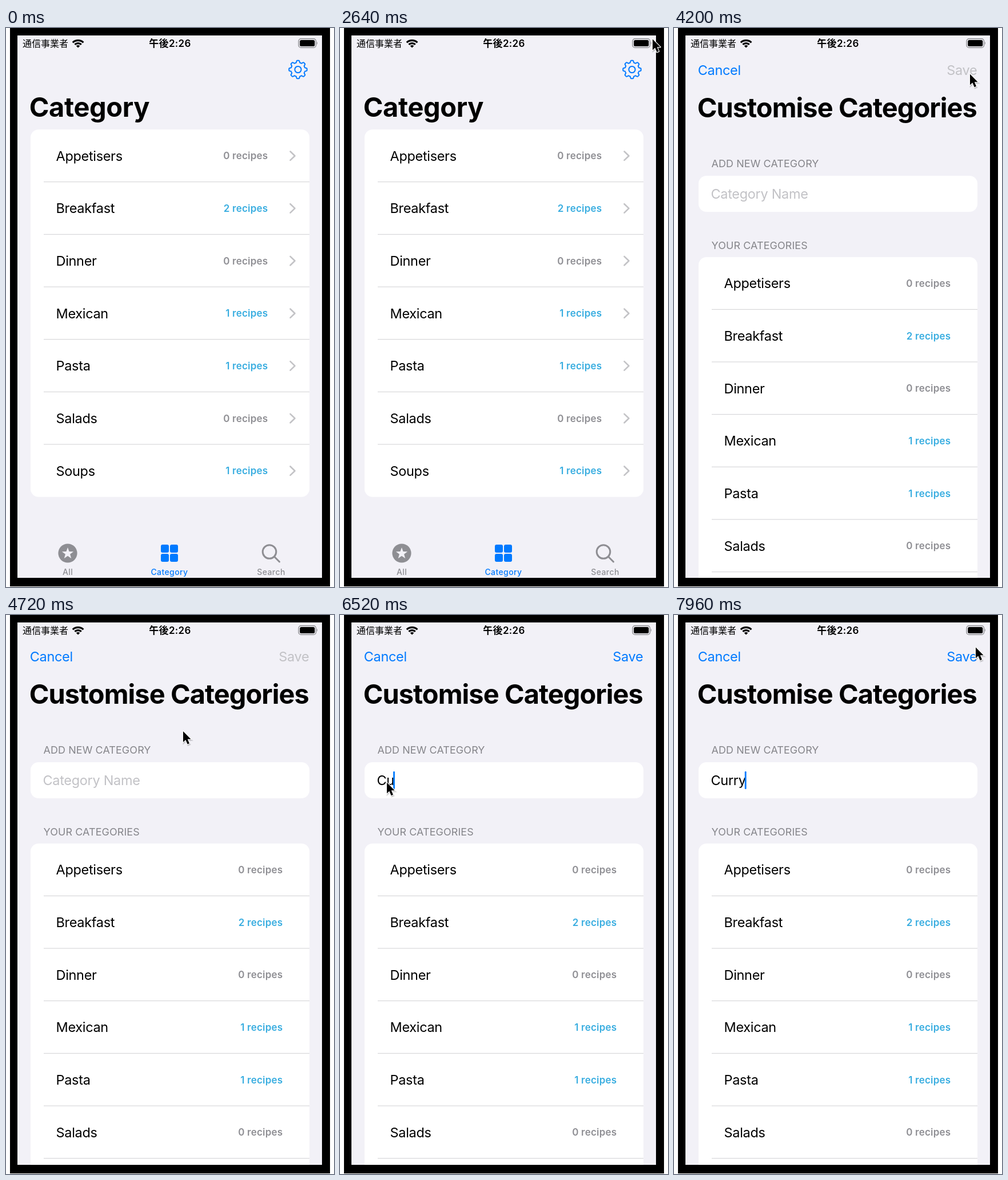
Write an HTML page that moves like this. It is 574x976 px and loops after 8000 ms.

```html
<!DOCTYPE html>
<html lang="en">
<head>
<meta charset="utf-8">
<title>Recipe categories</title>
<style>
  html, body { margin: 0; width: 100%; height: 100%; overflow: hidden; background: #fff; }
  svg { display: block; width: 574px; height: 976px; font-family: Inter, Roboto, sans-serif; font-optical-sizing: none; }
  text { white-space: pre; }
  .title { font-size: 46.9px; font-weight: 700; letter-spacing: -.3px; }
  .tight { letter-spacing: -.92px; }
  .body { font-size: 23.5px; letter-spacing: -.32px; }
  .count { font-size: 17px; font-weight: 600; letter-spacing: .2px; fill: #8e8e93; text-anchor: end; }
  .count.some { fill: #38ade0; }
  .head { font-size: 17.9px; letter-spacing: .12px; fill: #85858a; }
  .tab { font-size: 14px; font-weight: 500; letter-spacing: .4px; fill: #8e8e93; text-anchor: middle; }
  .cjk { font-family: Inter, "Noto Sans CJK JP", "Noto Sans CJK", sans-serif; }
  .blue, .tab.blue { fill: #007aff; }
  .faint { fill: #c2c2c6; }
  .end { text-anchor: end; }
</style>
</head>
<body>
<svg viewBox="0 0 574 976">
  <defs>
    <clipPath id="screen"><rect x="20" y="13" width="533" height="947"/></clipPath>
    <clipPath id="device"><rect x="7" width="560" height="975"/></clipPath>
  </defs>
  <rect x="7" width="560" height="975"/>
  <g clip-path="url(#screen)">
    <rect x="20" y="13" width="533" height="948" fill="#f2f1f7"/>
    <g id="home"></g>
    <g id="sheet"></g>
    <g id="status"></g>
  </g>
  <g clip-path="url(#device)">
    <g id="cursor">
      <g transform="translate(1 1.5) scale(.93)">
        <path d="M0 0V20.5L4.7 16.2L8.2 24.4L11.8 22.9L8.4 14.9H14.6Z" transform="translate(1 2)" fill="#0003" stroke="#0002" stroke-width="3"/>
        <path d="M0 0V20.5L4.7 16.2L8.2 24.4L11.8 22.9L8.4 14.9H14.6Z" stroke="#fff" stroke-width="2.6" stroke-linejoin="round" paint-order="stroke"/>
      </g>
    </g>
  </g>
</svg>
<script>
const LOOP = 8000, ROW = 91.66, WORD = 'Curry';
const $ = id => document.getElementById(id);
const categories = [['Appetisers', 0], ['Breakfast', 2], ['Dinner', 0], ['Mexican', 1], ['Pasta', 1], ['Salads', 0], ['Soups', 1]];

const text = (x, y, cls, label, extra = '') => `<text x="${x}" y="${y}" class="${cls}" ${extra}>${label}</text>`;

const card = (y, height) => `<rect x="43" y="${y}" width="488" height="${height}" rx="14" fill="#fff"/>`;

function list(top, countX, chevrons) {
  const rows = categories.map(([name, count], i) => {
    const mid = top + (i + .5) * ROW;
    const line = i ? `<path d="M66 ${top + i * ROW - .2}H531" stroke="#d0d0d3"/>` : '';
    const chevron = chevrons
      ? `<path d="M497.5 ${mid - 7.5}l8 7.7l-8 7.7" fill="none" stroke="#c3c3c6" stroke-width="2.6" stroke-linecap="round" stroke-linejoin="round"/>` : '';
    return line + text(87.5, mid + 8.6, 'body', name)
      + text(countX, mid + 6.4, count ? 'count some' : 'count', `${count} recipes`) + chevron;
  });
  return card(top, ROW * categories.length) + rows.join('');
}

// Closed outline whose radius depends on the angle, starting at the top.
function ring(cx, cy, steps, radius) {
  const points = Array.from({ length: steps }, (_, i) => {
    const a = i / steps * 2 * Math.PI, r = radius(a, i);
    return `${(cx + r * Math.sin(a)).toFixed(2)} ${(cy - r * Math.cos(a)).toFixed(2)}`;
  });
  return `M${points.join('L')}Z`;
}

const clamp = (v, lo = 0, hi = 1) => Math.min(hi, Math.max(lo, v));
const gear = ring(511, 72.5, 160, a => 14 + 1.7 * clamp(1.9 * Math.cos(8 * a), -1, 1));
const star = ring(108, 917.5, 10, (a, i) => i % 2 ? 4.3 : 10.6);
const tiles = [[271, 902], [287, 902], [271, 918], [287, 918]]
  .map(([x, y]) => `<rect x="${x}" y="${y}" width="14" height="14" rx="3"/>`).join('');

$('home').innerHTML = `
  <g id="gear" fill="none" stroke="#007aff" stroke-width="2" stroke-linejoin="round">
    <path d="${gear}"/><circle cx="511" cy="72.5" r="5.6"/></g>
  ${text(40.7, 155, 'title', 'Category')}
  ${list(177.2, 458.3, true)}
  <circle cx="108" cy="917" r="16.6" fill="#8e8e93"/><path d="${star}" fill="#f2f1f7"/>
  <g class="blue">${tiles}</g>
  <g fill="none" stroke="#8e8e93" stroke-width="3" stroke-linecap="round">
    <circle cx="461" cy="914.5" r="11.8"/><path d="M470 923.5L478.5 932"/></g>
  ${text(108, 954.5, 'tab', 'All')}
  ${text(286, 954.5, 'tab blue', 'Category')}
  ${text(464, 954.5, 'tab', 'Search')}`;

$('sheet').innerHTML = `
  <rect x="20" y="10" width="533" height="960" fill="#f2f1f7"/>
  ${text(41.7, 81, 'body blue', 'Cancel')}
  ${text(530.3, 81, 'body end', 'Save', 'id="save"')}
  ${text(40.7, 155, 'title tight', 'Customise Categories')}
  ${text(65.5, 242, 'head', 'ADD NEW CATEGORY')}
  ${card(257, 63)}
  ${text(64.5, 297, 'body', '', 'id="field"')}
  <rect id="caret" y="273" width="2.8" height="31" rx="1.2" class="blue"/>
  ${text(65.5, 385, 'head', 'YOUR CATEGORIES')}
  ${list(398.9, 484.3, false)}`;

$('status').innerHTML = `
  ${text(29, 33, 'cjk', '通信事業者', 'font-size="16"')}
  <g fill="none" stroke="#000" stroke-width="3.2">
    <path d="M116.8 25.3a13.4 13.4 0 0 1 18.6 0"/><path d="M120.4 28.9a8.3 8.3 0 0 1 11.4 0"/></g>
  <path d="M126.1 34.6l-3.3 -3.3a4.7 4.7 0 0 1 6.6 0Z"/>
  ${text(250.3, 33, 'cjk', '午後2:26', 'font-size="17" font-weight="600" letter-spacing=".3"')}
  <rect x="512" y="18.7" width="30.5" height="15.6" rx="4.4" fill="none" stroke="#8d8d91" stroke-width="1.4"/>
  <rect x="514.2" y="20.9" width="26.1" height="11.2" rx="2.6"/>
  <path d="M544 23.8q2 2.7 0 5.4Z" fill="#8d8d91"/>`;

// Rows are [time, ...values]; values ease between neighbouring rows.
function track(rows, t) {
  const next = rows.findIndex(row => row[0] > t);
  if (next < 0) return rows[rows.length - 1].slice(1);
  if (next === 0) return rows[0].slice(1);
  const a = rows[next - 1], b = rows[next];
  const p = (t - a[0]) / (b[0] - a[0]), e = p * p * (3 - 2 * p);
  return a.slice(1).map((v, i) => v + (b[i + 1] - v) * e);
}

const cursorPath = [
  [2320, 580, -30], [2640, 546, 18], [3080, 520, 83], [3160, 520, 82], [3240, 517, 79],
  [4520, 517, 79], [4920, 104, 322], [5120, 81, 291],
  [7480, 81, 291], [7800, 549, 28], [7960, 527, 55]];
const gearAlpha = [[3200, 1], [3280, .4], [3400, 1]];
const caretAlpha = [
  [5280, 0], [5440, 1], [5960, 1], [6080, 0], [6279, 0], [6280, 1],
  [7160, 1], [7320, 0], [7480, 0], [7600, 1]];
const keyTimes = [6280, 6440, 6760, 6920, 7000];

function draw(t) {
  const [x, y] = track(cursorPath, t);
  $('cursor').setAttribute('transform', `translate(${x} ${y})`);
  $('cursor').style.display = t < 2340 ? 'none' : '';
  $('gear').style.opacity = track(gearAlpha, t)[0];

  const open = t >= 4160;
  const settle = open && t < 4400 ? 2 * Math.exp((4160 - t) / 58) : 0;
  $('sheet').style.display = open ? '' : 'none';
  $('sheet').setAttribute('transform', `translate(0 ${settle})`);

  const typed = WORD.slice(0, keyTimes.filter(k => k <= t).length);
  const field = $('field');
  field.textContent = typed || 'Category Name';
  field.setAttribute('class', typed ? 'body' : 'body faint');
  $('save').setAttribute('class', typed ? 'body end blue' : 'body end faint');
  $('caret').setAttribute('x', 65.3 + (typed ? field.getComputedTextLength() - 2.6 : 0));
  $('caret').style.opacity = track(caretAlpha, t)[0];
}

function tick() {
  draw(performance.now() % LOOP);
  requestAnimationFrame(tick);
}
tick();
</script>
</body>
</html>
```
